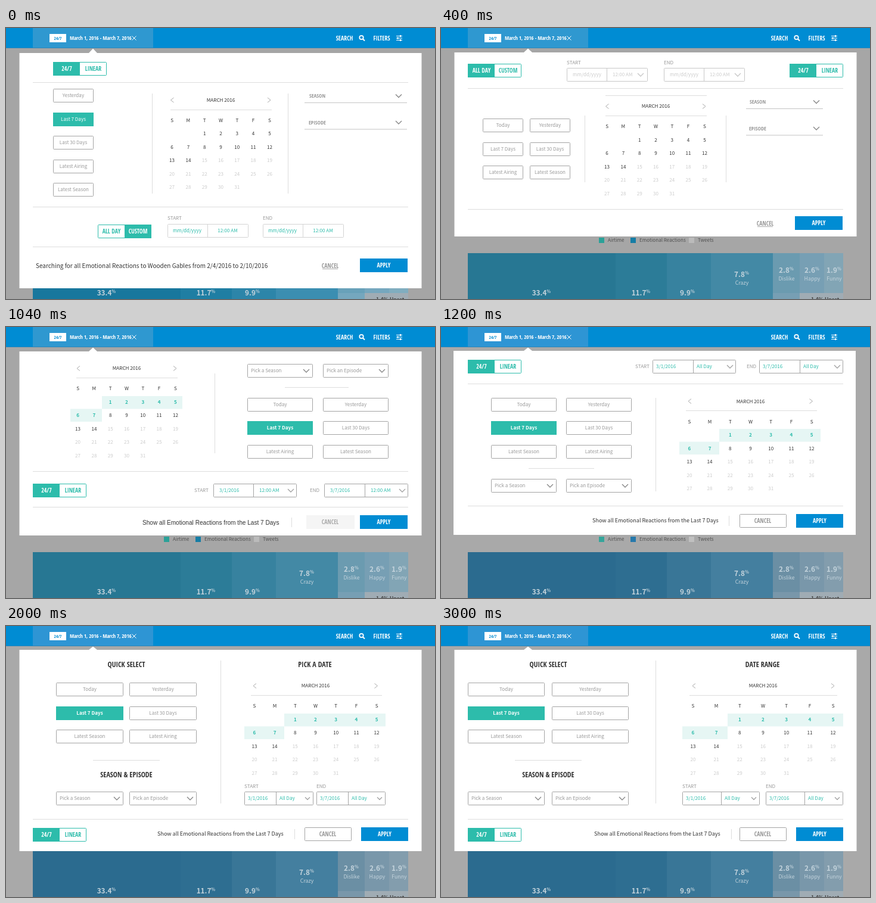
Write an HTML page with a canvas that moves like this. It is 720 px wide and 455 px high and loops after 3400 ms.

```html
<!DOCTYPE html>
<html lang="en">
<head>
<meta charset="utf-8">
<title>Date filter layouts</title>
<style>
  html, body { margin: 0; width: 100%; height: 100%; overflow: hidden; }
  canvas { display: block; }
</style>
</head>
<body>
<canvas id="stage" width="720" height="455"></canvas>
<script>
const ctx = document.getElementById('stage').getContext('2d');
const SANS = '"Noto Sans CJK JP", "Noto Sans CJK SC", "Noto Sans CJK", "Noto Sans", sans-serif';
const NARROW = '"Open Sans Condensed", "Open Sans", sans-serif';
const ARIAL = '"Liberation Sans", Arial, sans-serif';
const TEAL = '#2dbcab', BLUE = '#008cd3', INK = '#333', GREY = '#999', PALE = '#ccc', RULE = '#ddd';

// Text is placed by the middle of its capitals.
function text(str, x, y, { size = 8.1, color = GREY, align = 'left', weight = 400, family = SANS, spacing = 0 } = {}) {
  const stretch = family === NARROW ? 'condensed ' : '';
  ctx.font = `${weight} ${stretch}${size}px ${family}`;
  ctx.letterSpacing = `${spacing}px`;
  ctx.fillStyle = color;
  ctx.textAlign = align;
  ctx.fillText(str, x, y + size * 0.365);
}
const centered = (str, x, y, style) => text(str, x, y, { align: 'center', ...style });
const narrow = (str, x, y, style) => centered(str, x, y, { size: 9.8, weight: 300, family: NARROW, ...style });

function fill(x, y, w, h, color) {
  ctx.fillStyle = color;
  ctx.fillRect(x, y, w, h);
}
function frame(x, y, w, h, color = '#a4a4a4') {
  ctx.strokeStyle = color;
  ctx.lineWidth = 1;
  ctx.beginPath();
  ctx.roundRect(x + 0.5, y + 0.5, w - 1, h - 1, 1);
  ctx.stroke();
}
function path(points, color, width = 1) {
  ctx.strokeStyle = color;
  ctx.lineWidth = width;
  ctx.beginPath();
  points.forEach(([x, y]) => ctx.lineTo(x, y));
  ctx.stroke();
}
const hline = (y, x1 = 45, x2 = 675, color = RULE) => fill(x1, y, x2 - x1, 1, color);
const vline = (x, y1, y2) => fill(x, y1, 1, y2 - y1, RULE);
const chevron = (x, y, color = '#888', r = 5) =>
  path([[x - r, y - r / 2], [x, y + r / 2], [x + r, y - r / 2]], color, 1.4);
const arrow = (x, y, dir) => path([[x - 2.5 * dir, y - 4], [x + 2.5 * dir, y], [x - 2.5 * dir, y + 4]], '#aaa');

function button(label, x, y, w, activeWeight) {
  if (activeWeight) fill(x, y, w, 23, TEAL);
  else frame(x, y, w, 23);
  centered(label, x + w / 2, y + 11.5, activeWeight ? { color: '#fff', weight: activeWeight } : {});
}
function buttonGrid(labels, xs, y, w, activeWeight) {
  labels.forEach((label, i) => {
    const row = Math.floor(i / xs.length);
    button(label, xs[i % xs.length], Math.round(y + row * 39.5), w, label === 'Last 7 Days' && activeWeight);
  });
}
function toggle(a, b, x, y, second = false) {
  frame(x, y, 90, 23, TEAL);
  fill(x + (second ? 45 : 0), y, 45, 23, TEAL);
  narrow(a, x + 23, y + 11.5, second ? { color: TEAL } : { color: '#fff', weight: 600 });
  narrow(b, x + 67.5, y + 11.5, { color: second ? '#fff' : TEAL });
}
function select(label, x, y, w) {
  frame(x, y, w, 23);
  text(label, x + 6, y + 11.5);
  chevron(x + w - 11, y + 11.5);
}
function lineSelect(label, x, y, x1, x2, arrowX) {
  narrow(label, x, y, { align: 'left', size: 9 });
  chevron(arrowX, y);
  hline(y + 11, x1, x2, '#c4c4c4');
}
// A date cell and a time cell sharing one border.
function dateTime(date, time, x, y, split, w, { pad = 6, color = TEAL, border = '#a4a4a4', drop = 10, r = 5 } = {}) {
  frame(x, y, w, 23, border);
  fill(x + split, y, 1, 23, border);
  text(date, x + pad, y + 11.5, { color });
  text(time, x + split + pad, y + 11.5, { color });
  if (drop) chevron(x + w - drop, y + 11.5, border, r);
}

function calendar(x, y, pitch, { ruleX, range, arrows }) {
  const col = i => x + (i - 3) * pitch;
  const row = i => y + 56.5 + i * 22.5;
  centered('MARCH 2016', x, y, { color: INK });
  arrow(arrows[0], y, -1);
  arrow(arrows[1], y, 1);
  hline(Math.floor(y + 16), ...ruleX);
  if (range) {
    const [left, mid, right] = range;
    fill(mid, row(0) - 10, right - mid, 21.5, '#e6f6f4');
    fill(left, row(1) - 11, mid - left, 21.5, '#e6f6f4');
  }
  [...'SMTWTFS'].forEach((d, i) => centered(d, col(i), y + 34, { color: INK }));
  for (let day = 1; day <= 31; day++) {
    const cell = day + 1;
    const picked = range && day <= 7;
    centered(day, col(cell % 7), row(Math.floor(cell / 7)), {
      color: picked ? TEAL : day <= 14 ? INK : PALE, weight: picked ? 700 : 400 });
  }
}

function apply(x, y, w = 80) {
  fill(x, y, w, 23, BLUE);
  narrow('APPLY', x + w / 2, y + 11.5, { color: '#fff', weight: 600 });
}
function cancelLink(y) {
  narrow('CANCEL', 544, y);
  hline(y + 5, 531, 557, '#aaa');
}
function summary(x, y, sepX) {
  text('Show all Emotional Reactions from the Last 7 Days', x, y + 11, { size: 9.06, color: INK });
  vline(sepX, y + 3, y + 20);
  frame(501, y, 79, 23);
  narrow('CANCEL', 540, y + 11.5);
  apply(596, y, 79);
}

function chart(colors, legend) {
  const edges = [45, 293, 379, 453, 557, 602, 643, 675];
  colors.forEach((color, i) => fill(edges[i], 378, edges[i + 1] - edges[i], 77, color));
  fill(557, 445, 45, 10, colors[5]);
  fill(602, 445, 73, 10, '#a0acb4');
  text('1.4% Upset', 621, 456, { size: 8.5, color: '#444', weight: 700 });
  const share = (value, x, y, name) => {
    const style = { color: '#c3d3dc', weight: 700 };
    centered(value, x - 4, y, { size: 11.8, ...style });
    text('%', x + ctx.measureText(value).width / 2 - 4, y - 2.5, { size: 7.1, ...style });
    if (name) centered(name, x, y + 14, { size: 8.8, color: style.color });
  };
  share('33.4', 169, 445);
  share('11.7', 336, 445);
  share('9.9', 414, 445);
  share('7.8', 505, 414, 'Crazy');
  share('2.8', 580, 407, 'Dislike');
  share('2.6', 623, 407, 'Happy');
  share('1.9', 660, 407, 'Funny');
  [['Airtime', 265], ['Emotional Reactions', 318], ['Tweets', 416]].forEach(([name, x], i) => {
    fill(x, 352, 9, 9, legend[i]);
    text(name, x + 15, 356.5, { color: '#505050' });
  });
}

function header(tab) {
  fill(0, 0, 720, 34, BLUE);
  fill(45, 0, 202, 34, tab);
  fill(0, 33, 720, 1, '#2f86b8');
  fill(73, 10, 28, 14, '#fff');
  narrow('24/7', 87, 17, { size: 7.2, color: BLUE, weight: 600 });
  narrow('March 1, 2016 - March 7, 2016', 107, 17, { align: 'left', size: 9.2, color: '#fff', weight: 600, spacing: -0.2 });
  path([[211.5, 13.5], [218.5, 20.5]], '#fff');
  path([[218.5, 13.5], [211.5, 20.5]], '#fff');
  narrow('SEARCH', 568, 17, { color: '#fff', weight: 400 });
  narrow('FILTERS', 630.5, 17, { color: '#fff', weight: 400 });
  ctx.lineWidth = 1.8;
  ctx.beginPath();
  ctx.arc(596.5, 16, 3.2, 0, 7);
  ctx.stroke();
  path([[599, 18.5], [602, 21.5]], '#fff', 2);
  [[13.5, 662], [17, 657.5], [20.5, 662]].forEach(([y, x]) => {
    path([[655, y], [665, y]], '#fff');
    fill(x - 1, y - 1.5, 2, 3, '#fff');
  });
}

function panel(x, y, bottom) {
  fill(x, y, 675, bottom - y, '#fff');
  ctx.beginPath();
  [[139, y], [146, 34.5], [153, y]].forEach(p => ctx.lineTo(...p));
  ctx.fill();
}

const themes = {
  first: {
    grey: '#a5a5a5', tab: '#2f98d0', legend: ['#2ba198', '#167da5', '#bbb'],
    colors: ['#18779d', '#1f7ea3', '#2c85a9', '#3b8eb1', '#68a1b9', '#75a7be', '#80adbf']
  },
  teal: {
    grey: '#a6a6a6', tab: '#2f98d0', legend: ['#2ba198', '#167da5', '#bbb'],
    colors: ['#277793', '#2c7c98', '#37829f', '#4389a5', '#6b9bb0', '#779fb4', '#82a5b5']
  },
  blue: {
    grey: '#a9a9a9', tab: '#2e95d4', legend: ['#35a59b', '#2779ab', '#c0c0c0'],
    colors: ['#2b6b8f', '#2e6e91', '#397697', '#447f9f', '#6b8fa4', '#7997aa', '#839dad']
  }
};

const LATEST_LAST = ['Today', 'Yesterday', 'Last 7 Days', 'Last 30 Days', 'Latest Airing', 'Latest Season'];
const SEASON_FIRST = [...LATEST_LAST.slice(0, 4), 'Latest Season', 'Latest Airing'];

function threeColumns() {
  panel(22.5, 42, 437);
  toggle('24/7', 'LINEAR', 79, 57);
  hline(91);
  buttonGrid(['Yesterday', 'Last 7 Days', 'Last 30 Days', 'Latest Airing', 'Latest Season'], [79], 102.3, 68, 400);
  vline(245, 110, 278);
  vline(473, 110, 278);
  calendar(360.5, 121, 27.3, { ruleX: [276, 446], arrows: [279, 441.5] });
  lineSelect('SEASON', 509, 114, 501, 673, 659);
  lineSelect('EPISODE', 508, 158.5, 501, 673, 659);
  hline(300);
  toggle('ALL DAY', 'CUSTOM', 154, 330, true);
  [['START', 271], ['END', 431]].forEach(([label, x]) => {
    text(label, x, 319);
    dateTime('mm/dd/yyyy', '', x, 329, 67, 136, { pad: 9, border: '#d4d4d4', drop: 0 });
    centered('12:00 AM', x + 101, 340.5, { color: TEAL });
  });
  hline(367);
  text('Searching for all Emotional Reactions to Wooden Gables from 2/4/2016 to 2/10/2016', 50, 399, { size: 10, color: INK });
  cancelLink(399);
  apply(594, 387);
}

function controlsOnTop() {
  panel(22.5, 41, 350);
  toggle('ALL DAY', 'CUSTOM', 45, 60);
  toggle('24/7', 'LINEAR', 585, 60);
  [['START', 211], ['END', 374]].forEach(([label, x]) => {
    text(label, x, 58);
    dateTime('mm/dd/yyyy', '12:00 AM', x, 67, 67, 136, { pad: 10, color: PALE, border: '#c8c8c8', drop: 12 });
  });
  hline(101);
  buttonGrid(LATEST_LAST, [70, 149], 152, 68);
  vline(241, 147, 259);
  vline(478, 147, 259);
  hline(113, 276, 446);
  calendar(360.5, 131.5, 27.3, { ruleX: [276, 446], arrows: [279, 441.5] });
  lineSelect('SEASON', 518, 124, 512, 641, 630);
  lineSelect('EPISODE', 517, 168.5, 512, 641, 630);
  hline(304);
  cancelLink(328);
  apply(594, 316);
}

function calendarLeft() {
  panel(22.5, 41, 350);
  calendar(202.5, 69.5, 27.3, { ruleX: [118, 288], arrows: [121.5, 283.5], range: [108, 161, 296] });
  vline(350, 78, 212);
  select('Pick a Season', 405, 62, 110);
  select('Pick an Episode', 532, 62, 110);
  hline(101, 468, 575);
  buttonGrid(LATEST_LAST, [405, 532], 118.6, 110, 700);
  hline(242);
  toggle('24/7', 'LINEAR', 45, 263);
  text('START', 316, 274);
  dateTime('3/1/2016', '12:00 AM', 348, 263, 67, 140, { pad: 10 });
  text('END', 510, 274);
  dateTime('3/7/2016', '12:00 AM', 534, 263, 68, 141, { pad: 10 });
  hline(302);
  text('Show all Emotional Reactions from the Last 7 Days', 229, 328, { size: 10.1, color: INK, family: ARIAL });
  vline(479, 320, 336);
  fill(504, 316, 81, 23, '#f5f5f5');
  narrow('CANCEL', 544, 327.5, { color: '#aaa' });
  apply(594, 316);
}

function rangeRow(y) {
  toggle('24/7', 'LINEAR', 45, y);
  text('START', 326, y + 11);
  dateTime('3/1/2016', 'All Day', 355, y, 68, 140);
  text('END', 513, y + 11);
  dateTime('3/7/2016', 'All Day', 534, y, 68, 141);
}
function calendarRight(rowY, ruleY, gridY) {
  panel(21, 40, 349);
  rangeRow(rowY);
  hline(ruleY);
  buttonGrid(SEASON_FIRST, [84, 210], gridY - 0.4, 110, 700);
  hline(gridY + 118, 147, 257);
  select('Pick a Season', 84, gridY + 136, 110);
  select('Pick an Episode', 210, gridY + 136, 110);
  vline(360, gridY, gridY + 157);
  calendar(519.5, gridY + 5.6, 34.2, { ruleX: [411, 631], arrows: [417.5, 621], range: [400, 467, 637] });
  hline(300);
  summary(254, 314, 483);
}

function titledColumns({ xs, w, mid, title, calX, pitch, cal, times, split, timeW, summaryX, sepX }) {
  const heading = { size: 12, color: INK };
  panel(22.5, 40, 378);
  narrow('QUICK SELECT', mid, 65, heading);
  narrow(title, calX - 1, 65, heading);
  buttonGrid(SEASON_FIRST, xs, 95, w, 700);
  hline(225, mid - 56, mid + 56);
  narrow('SEASON & EPISODE', mid, 250, heading);
  select('Pick a Season', xs[0], 278, w);
  select('Pick an Episode', xs[1], 278, w);
  vline(360, 58, 298);
  calendar(calX, 100.5, pitch, cal);
  ['START', 'END'].forEach((label, i) => {
    text(label, times[i], 269);
    dateTime(i ? '3/7/2016' : '3/1/2016', 'All Day', times[i], 278, split, timeW, { r: 4 });
  });
  hline(324);
  toggle('24/7', 'LINEAR', 45, 339);
  summary(summaryX, 338, sepX);
}

const steps = [
  ['first', threeColumns],
  ['teal', controlsOnTop],
  ['teal', calendarLeft],
  ['blue', () => calendarRight(55, 95, 119)],
  ['blue', () => calendarRight(263, 247, 66)],
  ['blue', () => titledColumns({
    xs: [84, 207], w: 113, mid: 202, title: 'PICK A DATE', calX: 519.5, pitch: 34.2,
    cal: { ruleX: [411, 631], arrows: [417.5, 621], range: [400, 467, 637] },
    times: [400, 521], split: 53, timeW: 116, summaryX: 254, sepX: 484 })],
  ['blue', () => titledColumns({
    xs: [45, 186], w: 129, mid: 180, title: 'DATE RANGE', calX: 540.5, pitch: 39.2,
    cal: { ruleX: [417, 665], arrows: [424.5, 657.5], range: [405, 481, 675] },
    times: [405, 545], split: 65, timeW: 130, summaryX: 257, sepX: 487 })]
];

function draw() {
  const time = performance.now() % 3400;
  const [theme, layout] = steps[Math.min(6, Math.floor(time / 400))];
  const { grey, tab, colors, legend } = themes[theme];
  fill(0, 0, 720, 455, grey);
  chart(colors, legend);
  header(tab);
  layout();
  requestAnimationFrame(draw);
}
draw();
</script>
</body>
</html>
```
